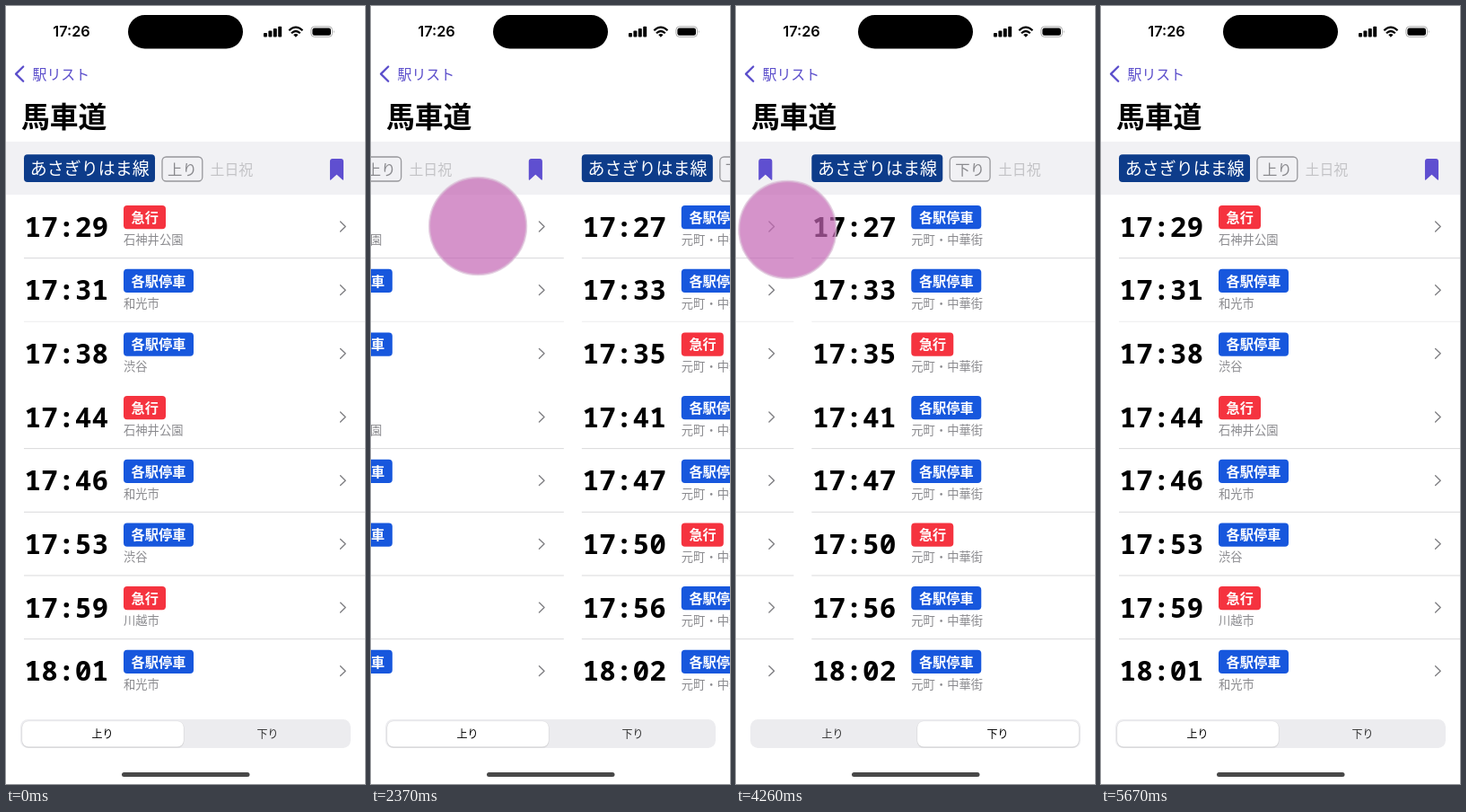
An HTML page for the animation above (5.7 s loop, 400 by 866 pixels).

```html
<!DOCTYPE html>
<html lang="ja">
<head>
<meta charset="utf-8">
<title>Timetable</title>
<style>
  html, body { margin: 0; width: 100%; height: 100%; overflow: hidden; background: #fff; }
  svg { display: block; width: 400px; height: 866px; }
  text { font-family: "Noto Sans CJK JP", "Noto Sans CJK", sans-serif; }
  .clock { font-family: Inter, sans-serif; font-weight: 600; }
  .time { font-family: "Noto Sans Mono", "DejaVu Sans Mono", monospace; font-weight: 700; }
</style>
</head>
<body>
<svg viewBox="0 0 400 866">
  <rect width="400" height="866" fill="#fff"/>
  <rect y="151" width="400" height="59" fill="#f1f1f4"/>
  <g id="pages"></g>
  <g id="chrome">
    <rect x="136" y="10" width="128" height="37.4" rx="18.7"/>
    <g id="signal"></g>
    <g fill="none" stroke="#000" stroke-width="2.2">
      <path d="M315.3 27.2Q322.9 20.2 330.5 27.2"/>
      <path d="M318 30.2Q322.9 25.8 327.8 30.2"/>
    </g>
    <path d="M320.2 32Q322.9 29.8 325.6 32L322.9 34.8Z"/>
    <rect x="339.9" y="22.9" width="23.6" height="11.4" rx="3.6" fill="none" stroke="#aaa"/>
    <rect x="341.4" y="24.4" width="20.6" height="8.4" rx="2.3"/>
    <path d="M364.9 26.8Q366.6 28.6 364.9 30.4Z" fill="#aaa"/>
    <path d="M19.2 67.5L11 75.6L19.2 83.7" fill="none" stroke="#5a4dcb" stroke-width="2.3" stroke-linecap="round" stroke-linejoin="round"/>
    <rect x="16" y="794" width="368" height="32" rx="8.5" fill="#ececef"/>
    <g id="thumb">
      <rect x="17.6" y="796" width="180.8" height="30" rx="7.5" opacity=".08"/>
      <rect x="18" y="796" width="180" height="28.6" rx="7" fill="#fff" stroke="#000" stroke-opacity=".06" stroke-width=".6"/>
    </g>
    <rect x="129" y="853" width="142.5" height="5" rx="2.5" fill="#484848"/>
  </g>
  <circle id="touch" r="54" fill="#c466b4" fill-opacity=".7" stroke="#d9b9d4" stroke-opacity=".65" stroke-width="2.4"/>
</svg>
<script>
const LOOP = 5700;
const PITCH = 70.67;
const VIOLET = '#5f4fd0';
const $ = id => document.getElementById(id);

function add(parent, tag, attrs, content) {
  const el = document.createElementNS('http://www.w3.org/2000/svg', tag);
  for (const key in attrs) el.setAttribute(key, attrs[key]);
  if (content) el.textContent = content;
  parent.append(el);
  return el;
}

// Japanese text, vertically centred on y
function label(parent, content, x, y, size, fill, weight = 400, anchor = 'start') {
  return add(parent, 'text', {
    x, y: y + size * .38, fill, 'font-size': size, 'font-weight': weight, 'text-anchor': anchor
  }, content);
}

function row(page, i, time, dest, express) {
  const g = add(page, 'g', { transform: `translate(0 ${245.5 + i * PITCH})` });
  add(g, 'text', { class: 'time', x: 20.6, y: 11.2, 'font-size': 31.2 }, time);
  add(g, 'rect', {
    x: 131, y: -23.4, width: express ? 47 : 78, height: 26.2, rx: 4,
    fill: express ? '#f5333f' : '#1757dd'
  });
  label(g, express ? '急行' : '各駅停車', 139.6, -10.2, 15.2, '#fff', 700);
  label(g, dest, 131, 14.5, 13.3, '#8a8a8e');
  add(g, 'path', {
    d: 'M372.6 -5.4L378.2 0L372.6 5.4', fill: 'none', stroke: '#808084',
    'stroke-width': 1.4, 'stroke-linecap': 'round', 'stroke-linejoin': 'round'
  });
  // Hairlines fade out on some rows
  if (i % 5 !== 2) {
    add(g, 'rect', { x: 20, y: 34.6, width: 380, height: 1, fill: i === 1 ? '#ececed' : '#d9d9db' });
  }
}

function page(x, direction, saved, rows) {
  const g = add($('pages'), 'g', { transform: `translate(${x} 0)` });
  add(g, 'rect', { x: 20, y: 165.2, width: 146, height: 30.8, rx: 4, fill: '#0d3c8a' });
  label(g, 'あさぎりはま線', 26.8, 180.7, 19, '#fff');
  add(g, 'rect', {
    x: 174, y: 168, width: 44.8, height: 27, rx: 4.5, fill: 'none', stroke: '#98989c', 'stroke-width': 1.3
  });
  label(g, direction, 196.4, 181.4, 16.4, '#89898d', 500, 'middle');
  label(g, '土日祝', 227.6, 181.6, 15.9, '#c3c3c6');
  add(g, 'path', {
    d: 'M361.6 173Q361.6 170.6 364 170.6H373Q375.4 170.6 375.4 173V193L368.5 186.8L361.6 193Z',
    fill: saved ? VIOLET : 'none', stroke: VIOLET, 'stroke-width': 1.3, 'stroke-linejoin': 'round'
  });
  rows.forEach(([time, dest, express], i) => row(g, i, time, dest, express));
}

page(0, '上り', true, [
  ['17:29', '石神井公園', true], ['17:31', '和光市'], ['17:38', '渋谷'], ['17:44', '石神井公園', true],
  ['17:46', '和光市'], ['17:53', '渋谷'], ['17:59', '川越市', true], ['18:01', '和光市']
]);
page(400, '下り', false, ['17:27', '17:33', '17:35', '17:41', '17:47', '17:50', '17:56', '18:02']
  .map((time, i) => [time, '元町・中華街', i % 3 === 2 && i < 7]));

for (let i = 0; i < 4; i++) {
  const height = 4.5 + i * 2.45;
  add($('signal'), 'rect', { x: 287 + i * 5.4, y: 34.5 - height, width: 4, height, rx: 1 });
}

const chrome = $('chrome');
add(chrome, 'text', { class: 'clock', x: 73, y: 34.2, 'font-size': 16.3, 'text-anchor': 'middle' }, '17:26');
label(chrome, '駅リスト', 29.6, 75.6, 15.9, '#5a4dcb');
label(chrome, '馬車道', 17, 123, 31.8, '#000', 700);
const up = label(chrome, '上り', 107.6, 810.3, 12, '#000', 500, 'middle');
const down = label(chrome, '下り', 291.6, 810.3, 12, '#000', 500, 'middle');

// Times at which each swipe starts, flips the segment, and settles
const forward = { start: 2073, flip: 2385, end: 2700 };
const back = { start: 4084, flip: 4430, end: 4781 };
const FLIP_TIME = 325;

function ease(t, from, to) {
  const p = Math.min(1, Math.max(0, (t - from) / (to - from)));
  return p * p * (3 - 2 * p);
}

const slide = (t, swipe) => ease(t, swipe.start, swipe.end);
const flip = (t, swipe) => ease(t, swipe.flip, swipe.flip + FLIP_TIME);
const press = (t, swipe) =>
  ease(t, swipe.start - 60, swipe.start + 20) - ease(t, swipe.end - 40, swipe.end + 40);

function move(el, x, y = 0) {
  el.setAttribute('transform', `translate(${x} ${y})`);
}

function choose(el, selected) {
  el.setAttribute('font-weight', selected ? 500 : 400);
  el.setAttribute('fill', selected ? '#000' : '#333');
}

function render(t) {
  move($('pages'), 400 * (slide(t, back) - slide(t, forward)));
  move($('thumb'), 184 * (flip(t, forward) - flip(t, back)));

  // The finger leads each swipe, then lifts; the first one lifts sooner
  const goingBack = t > 3000;
  const x = goingBack ? 5 + 326 * slide(t, back) : Math.max(36, 270 - 326 * slide(t, forward));
  const shown = goingBack ? press(t, back) : press(t, { start: forward.start, end: forward.end - 80 });
  move($('touch'), x, goingBack ? 249 : 245);
  $('touch').setAttribute('opacity', shown);

  const isDown = t >= forward.flip && t < back.flip;
  choose(up, !isDown);
  choose(down, isDown);
}

const begin = performance.now();
function tick() {
  render((performance.now() - begin) % LOOP);
  requestAnimationFrame(tick);
}
tick();
</script>
</body>
</html>
```
